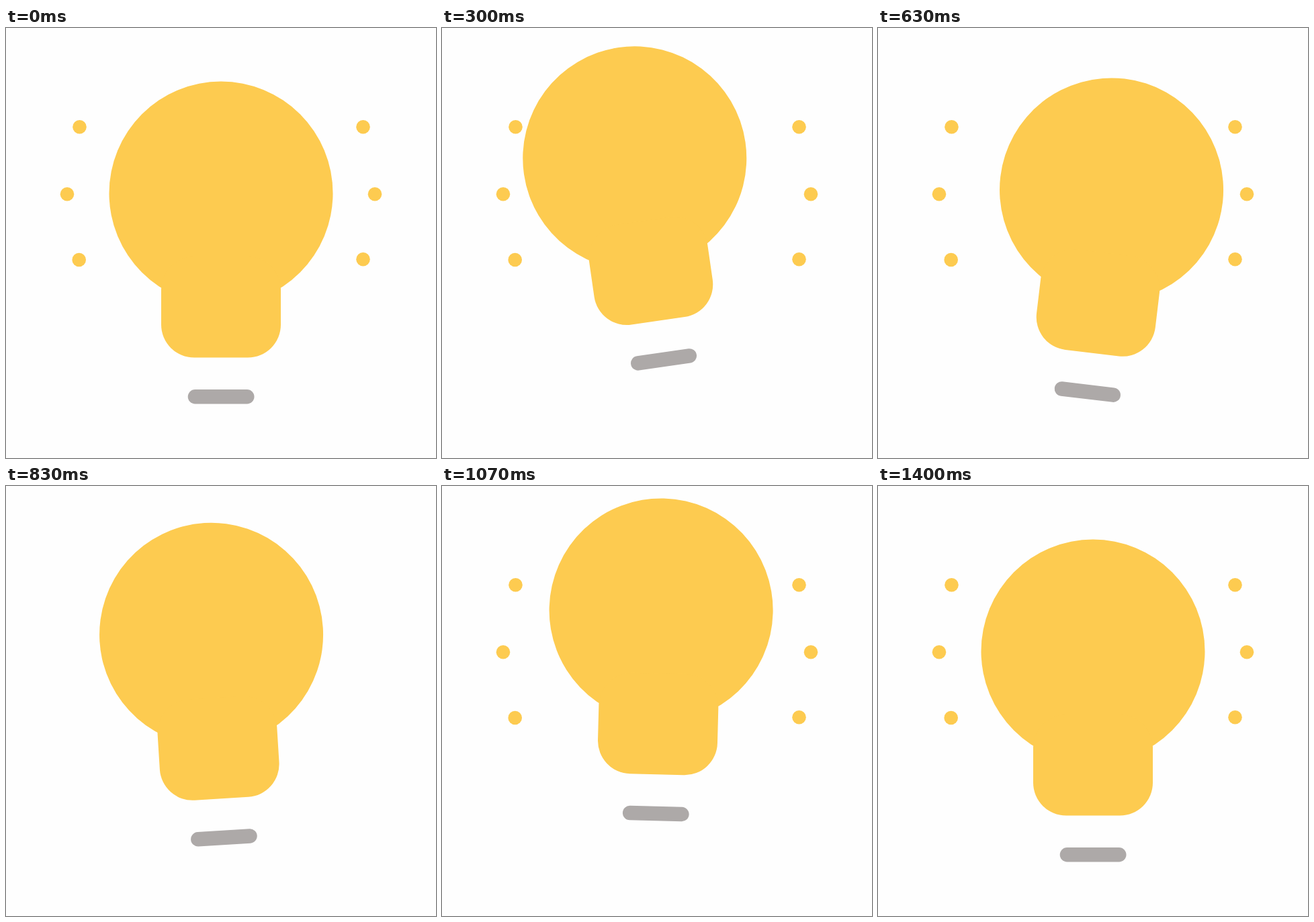
Animation, 640 px wide and 640 px high, one loop 1670 ms. Source, as an HTML page:

```html
<!DOCTYPE html>
<html lang="en">
<head>
<meta charset="utf-8">
<title>Jumping light bulb</title>
<style>
  html, body { margin: 0; width: 100%; height: 100%; overflow: hidden; background: #fefefe; }
  svg { display: block; width: 100%; height: 100%; }
  .glow { fill: #fdcb50; }
  .base { fill: #ada9a8; }
</style>
</head>
<body>
<svg viewBox="0 0 640 640">
  <g id="dots" class="glow">
    <circle cx="109.5" cy="147.3" r="10.3"/>
    <circle cx="91" cy="247.2" r="10.3"/>
    <circle cx="108.7" cy="345" r="10.3"/>
    <circle cx="531.5" cy="147.3" r="10.3"/>
    <circle cx="549" cy="247.2" r="10.3"/>
    <circle cx="531.5" cy="344.2" r="10.3"/>
  </g>
  <g id="bulb">
    <circle class="glow" cx="320" cy="246" r="166.5"/>
    <rect class="glow" x="231" y="340" width="178" height="150.5" rx="49"/>
    <rect class="base" x="270.7" y="538" width="98.8" height="21.5" rx="10.75"/>
  </g>
</svg>
<script>
  const LOOP = 1670, STEP = 100 / 3, LAST = 42;
  const bulb = document.getElementById('bulb');
  const dots = document.getElementById('dots');

  // Keys are [step, value], joined by sine easing.
  const lift = [[0, 0], [10.8, -58.5], [11.9, -58.5], [21, 0], [30.3, -64.5], [42, 0]];
  const tilt = [[0, 0], [7.5, -8.2], [13, -8.2], [19.6, 7.1], [25.8, -4], [32, 1.5], [42, 0]];
  const blinks = [[10, 17], [23, 29]];

  function at(keys, n) {
    const i = Math.max(1, keys.findIndex(k => k[0] >= n));
    const [n0, v0] = keys[i - 1], [n1, v1] = keys[i];
    return v0 + (v1 - v0) * (1 - Math.cos(Math.PI * (n - n0) / (n1 - n0))) / 2;
  }

  function draw(now) {
    const t = now % LOOP;
    const n = Math.min(LAST, Math.floor((t + 5) / STEP));
    const off = blinks.some(([a, b]) => n >= a && n < b);
    bulb.setAttribute('transform', `translate(0 ${at(lift, n)}) rotate(${at(tilt, n)} 320 479)`);
    dots.setAttribute('visibility', off ? 'hidden' : 'visible');
  }

  let start;
  function tick(now) {
    start ??= now;
    draw(now - start);
    requestAnimationFrame(tick);
  }
  draw(0);
  requestAnimationFrame(tick);
</script>
</body>
</html>
```
